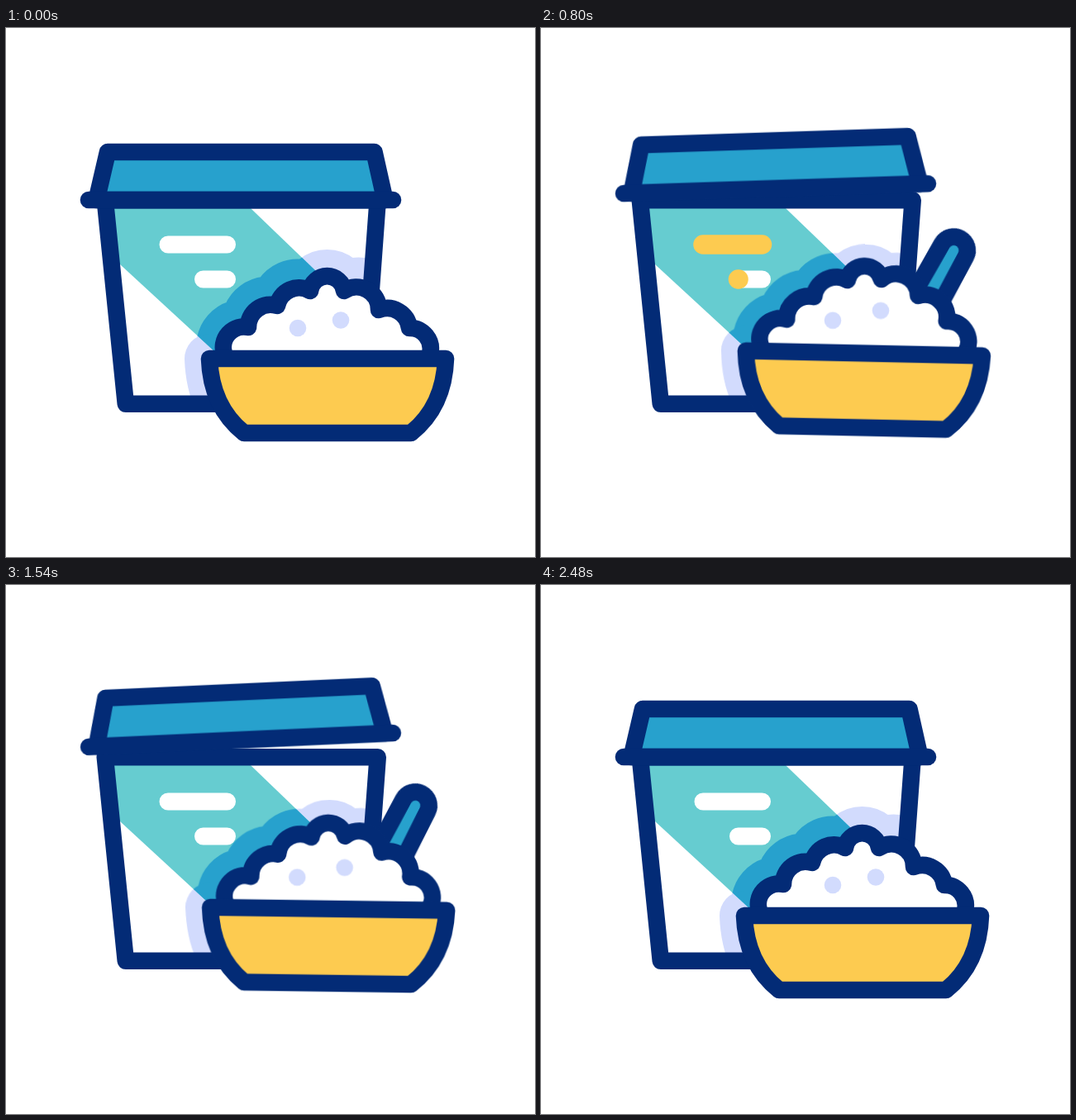
These frames come from a looping animation (640x640 px, 2600 ms). An HTML page without scripts:

```html
<!DOCTYPE html>
<html lang="en">
<head>
<meta charset="utf-8">
<title>Tub and bowl</title>
<style>
html, body { margin: 0; width: 100%; height: 100%; overflow: hidden; background: #fff; }
svg { display: block; width: 100%; height: 100%; }

.line { stroke: #032b76; stroke-width: 20.6; stroke-linecap: round; stroke-linejoin: round; }
.blue { fill: #27a1cd; }
.bar { fill: none; stroke: #fff; stroke-width: 21; stroke-linecap: round; }
.mark { stroke: #fdcb50; stroke-width: 23.5; }
.shade { stroke-width: 65; stroke-linejoin: round; }

.lid, .bowl, .spoon, .rice, .dot, .mark { animation: 2600ms ease-in-out infinite; }
.lid { transform-origin: 284px 208px; animation-name: lid; }
.bowl { transform-origin: 389px 490px; animation-name: bowl; }
.spoon { transform-origin: 0 0; animation-name: spoon; }
.rice { animation-name: rice; }
.dot { fill: #d2dbfd; animation-name: dot; }
.m1 { animation-name: mark1; }
.m2 { animation-name: mark2; }

@keyframes lid {
  0%, 8.46% { transform: translateY(0) rotate(0deg); animation-timing-function: ease-in; }
  15.38% { transform: translateY(-32px) rotate(-1.87deg); animation-timing-function: ease-out; }
  22.7% { transform: translateY(-46px) rotate(-5.8deg); animation-timing-function: ease-in; }
  30.77% { transform: translateY(-14px) rotate(-1.87deg); animation-timing-function: linear; }
  33.1% { transform: translateY(0) rotate(0deg); animation-timing-function: ease-out; }
  36.9% { transform: translateY(-6px) rotate(1.56deg); animation-timing-function: ease-in; }
  43.85% { transform: translateY(-30px) rotate(-.3deg); animation-timing-function: ease-out; }
  51.6%, 52.3% { transform: translateY(-45.7px) rotate(-5.8deg); animation-timing-function: ease-in; }
  62.3% { transform: translateY(0) rotate(0deg); animation-timing-function: ease-out; }
  66.9% { transform: translateY(-6px) rotate(1.56deg); }
  71.5%, 100% { transform: translateY(0) rotate(0deg); }
}
@keyframes bowl {
  0%, 8.46% { transform: translateY(0) rotate(0deg); }
  14.6% { transform: translateY(-5px) rotate(.8deg); }
  20.4% { transform: translateY(1.5px) rotate(-2deg); }
  28% { transform: translateY(-9.5px) rotate(1.7deg); animation-timing-function: ease-in; }
  30.77% { transform: translateY(-6.5px) rotate(1.2deg); }
  40.4% { transform: translateY(1.5px) rotate(-2deg); animation-timing-function: ease-in; }
  43.85% { transform: translateY(-2.5px) rotate(-1.6deg); animation-timing-function: ease-out; }
  53.5% { transform: translateY(-10.7px) rotate(1.3deg); animation-timing-function: ease-in; }
  66.9% { transform: translateY(-.5px) rotate(-.9deg); animation-timing-function: ease-out; }
  70.4% { transform: translateY(1px) rotate(-1.9deg); }
  79.5% { transform: translateY(-9px) rotate(1.4deg); }
  86.5% { transform: translateY(1.5px) rotate(-2deg); }
  91%, 100% { transform: translateY(0) rotate(0deg); }
}
@keyframes spoon {
  0%, 8.46% { transform: rotate(-53deg) translateX(70px); animation-timing-function: linear; }
  15.38% { transform: rotate(-53deg) translateX(149px); animation-timing-function: ease-out; }
  20.4% { transform: rotate(-49.5deg) translateX(185px); }
  31.5% { transform: rotate(-61.2deg) translateX(185px); }
  44.4% { transform: rotate(-46deg) translateX(185px); }
  57.7% { transform: rotate(-63deg) translateX(185px); }
  71.5% { transform: rotate(-46deg) translateX(185px); }
  80.8% { transform: rotate(-60deg) translateX(190px); }
  90% { transform: rotate(-46.5deg) translateX(218px); animation-timing-function: ease-in; }
  95%, 100% { transform: rotate(-50deg) translateX(70px); }
}
@keyframes rice {
  0%, 8.46%, 95%, 100% {
    d: path("M264 394A25 25 0 0 1 293 362A27 27 0 0 1 328 336A27 27 0 0 1 368 318A20.7 20.7 0 0 1 409 318A27 27 0 0 1 451 341A27 27 0 0 1 488 363A25 25 0 0 1 513 394");
  }
  20%, 43.85%, 66.9%, 71.5%, 88% {
    d: path("M264 394A25 25 0 0 1 295 371A27 27 0 0 1 327 348A27 27 0 0 1 367 326A20.1 20.1 0 0 1 407 326A28 28 0 0 1 447 344A28 28 0 0 1 484 370A25 25 0 0 1 512 394");
  }
  30.3%, 31.5%, 52.3%, 57%, 80% {
    d: path("M264 394A25 25 0 0 1 294.5 361A27 27 0 0 1 327 333A27 27 0 0 1 367 312A21 21 0 0 1 408 310A27 27 0 0 1 453 329A27 27 0 0 1 488 359A25 25 0 0 1 513 394");
  }
}
@keyframes dot {
  0%, 8.46%, 95%, 100% { transform: translate(0, 0); }
  20%, 43.85%, 66.9%, 71.5%, 88% { transform: var(--low); }
  30.3%, 31.5%, 52.3%, 57%, 80% { transform: var(--high); }
}
@keyframes mark1 {
  0%, 23.84%, 39.25%, 59.99%, 75.45%, 100% { opacity: 0; stroke-dasharray: 0 2; }
  23.85%, 39.2%, 60%, 75.4% { opacity: 1; stroke-dasharray: 0 2; }
  30%, 34.6%, 66.15%, 70.8% { opacity: 1; stroke-dasharray: 1 2; }
}
@keyframes mark2 {
  0%, 30.39%, 41.55%, 66.54%, 77.75%, 100% { opacity: 0; stroke-dasharray: 0 2; }
  30.4%, 41.5%, 66.55%, 77.7% { opacity: 1; stroke-dasharray: 0 2; }
  34.6%, 37.7%, 70.8%, 73.85% { opacity: 1; stroke-dasharray: 1 2; }
}
</style>
</head>
<body>
<svg viewBox="0 0 640 640">
  <defs>
    <path id="tub" d="M119.8 208.2H449.7L431.7 454.8H144.8Z"/>
    <path id="band" d="M100 208H285.5L430 347L330 463L100 251Z"/>
    <path id="dish" d="M246 400H532Q530 458 490 490H288Q248 458 246 400Z"/>
    <path id="heap" d="M264 394A25 25 0 0 1 293 361A25 25 0 0 1 328 335A25 25 0 0 1 368 317A21 21 0 0 1 409 317A25 25 0 0 1 451 339A25 25 0 0 1 488 362A25 25 0 0 1 513 394"/>
    <g id="halo">
      <use href="#heap"/>
      <use href="#dish" stroke-width="60"/>
    </g>
    <clipPath id="inTub"><use href="#tub"/></clipPath>
    <clipPath id="inBand"><use href="#band"/></clipPath>
  </defs>

  <g clip-path="url(#inTub)">
    <g class="bowl shade" fill="#d2dbfd" stroke="#d2dbfd"><use href="#halo"/></g>
    <use href="#band" fill="#66ccd0"/>
    <g clip-path="url(#inBand)">
      <g class="bowl shade" fill="#27a1cd" stroke="#27a1cd"><use href="#halo"/></g>
    </g>
  </g>
  <path class="bar" d="M196 262H267.5M238.5 304H267.5"/>
  <path class="bar mark m1" pathLength="1" d="M196 262H267.5"/>
  <path class="bar mark m2" pathLength="1" d="M238.5 304H267.5"/>
  <use href="#tub" class="line" fill="none"/>

  <g class="lid line">
    <path class="blue" d="M109.5 208L123 150H445.5L458.5 208Z"/>
    <path d="M100 208H468"/>
  </g>

  <g transform="translate(410 431)">
    <path class="spoon line blue" d="M-125 -18L0 -16.4A16.4 16.4 0 0 1 0 16.4L-125 18Z"/>
  </g>

  <g class="bowl">
    <path class="rice line" fill="#fff"/>
    <circle class="dot" cx="353" cy="363" r="10.3" style="--low:translate(0,10px);--high:translate(-2.7px,-2px)"/>
    <circle class="dot" cx="405" cy="353.5" r="10.3" style="--low:translate(1px,12px);--high:translate(3px,-5.5px)"/>
    <use href="#dish" class="line" fill="#fdcb50"/>
  </g>
</svg>
</body>
</html>
```
